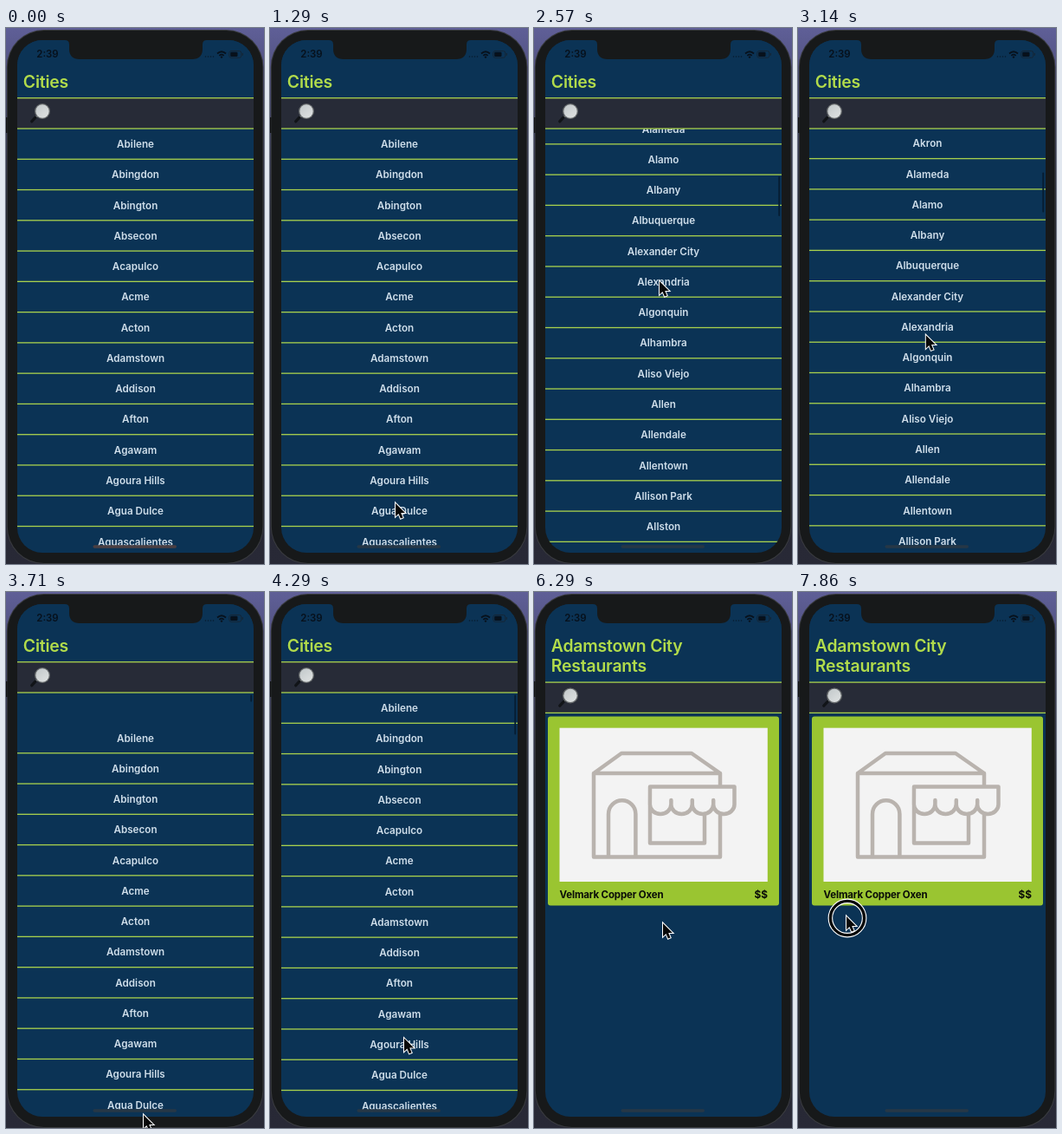
These frames come from a looping animation (298x618 px, 8000 ms). An HTML page with a canvas:

```html
<!DOCTYPE html>
<html lang="en">
<head>
<meta charset="utf-8">
<title>Cities</title>
<style>
html, body { margin: 0; width: 100%; height: 100%; overflow: hidden; background: #17191b; }
canvas { display: block; width: 298px; height: 618px; }
</style>
</head>
<body>
<canvas id="stage"></canvas>
<script>
const W = 298, H = 618, LOOP = 8000, STEP = 142.6, LAST = 55, PITCH = 35.27;
const NAVY = '#0b3355', LIME = '#a9d14c', BEZEL = '#17191a', INK = '#07111c';
const FONT = 'Inter, "Liberation Sans", sans-serif';
const cities = ('Abilene,Abingdon,Abington,Absecon,Acapulco,Acme,Acton,Adamstown,Addison,Afton,' +
  'Agawam,Agoura Hills,Agua Dulce,Aguascalientes,Ahwatukee,Airway Heights,Akron,Alameda,Alamo,' +
  'Albany,Albuquerque,Alexander City,Alexandria,Algonquin,Alhambra,Aliso Viejo,Allen,Allendale,' +
  'Allentown,Allison Park,Allston,Aloha,Alpharetta,Alpine').split(',');

// Key poses as [step, value...], joined linearly
const scrollKeys = [[9, 0], [10, 30], [11, 105], [12, 185], [13, 247], [14, 380], [15, 480], [16, 550],
  [17, 595], [18, 617], [21, 617], [22, 565], [23, 425], [24, 240], [25, 70], [26, -34.5], [27, -18],
  [28, -5], [29, 0]];
const cursorKeys = [[4, 160, 625], [8, 146, 548], [9, 145, 548], [13, 145, 292], [21, 145, 292],
  [26, 159, 603], [28, 159, 603], [33, 149, 382], [46, 149, 382], [51, 68, 367], [52, 68, 367],
  [54, 56, 374]];
const slideKeys = [[38, 0], [39, .42], [40, .78], [41, .94], [42, 1]];

const canvas = document.getElementById('stage'), c = canvas.getContext('2d');
const dpr = window.devicePixelRatio || 1;
canvas.width = W * dpr;
canvas.height = H * dpr;

function at(keys, t, k = 1) {
  const i = keys.findIndex(key => key[0] > t);
  if (i === 0) return keys[0][k];
  if (i < 0) return keys[keys.length - 1][k];
  const a = keys[i - 1], b = keys[i];
  return a[k] + (b[k] - a[k]) * (t - a[0]) / (b[0] - a[0]);
}

function rect(x, y, w, h, fill) {
  c.fillStyle = fill;
  c.fillRect(x, y, w, h);
}

function round(x, y, w, h, r, fill) {
  c.beginPath();
  c.roundRect(x, y, w, h, r);
  c.fillStyle = fill;
  c.fill();
}

function text(s, x, y, size, color, align = 'left', weight = 600, gap = 0) {
  c.font = `${weight} ${size}px ${FONT}`;
  c.letterSpacing = gap + 'px';
  c.textAlign = align;
  c.fillStyle = color;
  c.fillText(s, x, y);
}

function stroke(d, color, width) {
  c.strokeStyle = color;
  c.lineWidth = width;
  c.stroke(new Path2D(d));
}

function disc(x, y, r, fill) {
  c.beginPath();
  c.arc(x, y, r, 0, 7);
  c.fillStyle = fill;
  c.fill();
}

const rule = y => rect(13, y - .65, 273, 1.3, LIME);

function searchBar(y) {
  rect(13, y, 273, 35.4, '#272b37');
  c.lineCap = 'round';
  stroke(`M36 ${y + 20.5}L34 ${y + 22.5}`, '#8c9092', 2);
  stroke(`M34 ${y + 22.5}L29.8 ${y + 27}`, '#111418', 3.4);
  disc(42, y + 15.3, 9, '#65696b');
  const g = c.createLinearGradient(36, y + 8, 48, y + 23);
  g.addColorStop(0, '#c3c9cb');
  g.addColorStop(1, '#dfe2e2');
  disc(42, y + 15.3, 7.7, g);
  rule(y);
  rule(y + 35.3);
}

function header(lines) {
  const top = 57.3 + 23.4 * lines.length;
  rect(13, 14, 273, top - 14, NAVY);
  lines.forEach((s, i) => text(s, 19.8, 69 + 23.3 * i, 19.4, '#b2dc4b', 'left', 600, -.2));
  searchBar(top);
}

function listPage(scroll, t) {
  rect(13, 14, 273, 592, NAVY);
  cities.forEach((name, i) => {
    const y = 116 + PITCH * i - scroll;
    if (y < 70 || y > 620) return;
    text(name, 149.5, y + 22, 11.7, '#cfdeea', 'center');
    rule(y + PITCH);
  });
  header(['Cities']);
  c.globalAlpha = t < 10 ? 0 : Math.max(0, Math.min(1, (41 - t) / 3));
  const length = scroll < 0 ? Math.max(8, 46 + scroll * 1.1) : 46;
  round(282.3, 118.5 + Math.max(0, scroll) * .085, 1.8, length, .9, '#061d33');
  c.globalAlpha = 1;
}

function shop() {
  rect(29.5, 156.7, 240.3, 177.3, '#f3f3f3');
  c.lineJoin = 'round';
  c.lineCap = 'round';
  stroke('M215 257V305.5H69V209L101 186H182L215 209V223M69 209H215' +
    'M86 305V256a15.7 15.7 0 0 1 31.4 0V305' +
    'M134 246V289.5H197V257' +
    'M134 224.5H231.5V245a12.2 11 0 0 1-24.4 0a12.2 11 0 0 1-24.4 0a12.2 11 0 0 1-24.4 0a12.2 11 0 0 1-24.4 0Z' +
    'M158.4 240V246M182.8 240V246M207.2 240V246', '#b9b3ae', 4.5);
}

function shopPage() {
  rect(13, 14, 273, 592, NAVY);
  header(['Adamstown City', 'Restaurants']);
  round(16, 143.5, 267, 218, 3, '#9ac531');
  shop();
  text('Velmark Copper Oxen', 29.5, 352.6, 11.5, '#0a0d08', 'left', 700, -.15);
  text('$$', 270, 352.6, 11.8, '#0a0d08', 'right', 700);
}

function statusBar() {
  text('2:39', 35.3, 34.3, 11.4, INK);
  for (let i = 0; i < 4; i++) disc(230.5 + i * 3, 33, .8, '#071b2d');
  c.lineCap = 'butt';
  stroke('M244 29.5Q249 25 254 29.5', INK, 1.8);
  stroke('M246.3 31.8Q249 29.5 251.7 31.8', INK, 1.6);
  disc(249, 33.6, 1.2, INK);
  c.strokeStyle = '#152636';
  c.lineWidth = 1;
  c.beginPath();
  c.roundRect(257.8, 26.5, 14, 7.8, 2.3);
  c.stroke();
  round(259.2, 27.8, 8.3, 5.2, 1.2, INK);
  rect(272.7, 29, 1.2, 2.8, '#152636');
}

function phone() {
  const g = c.createLinearGradient(0, 0, 0, H);
  g.addColorStop(0, '#5f5f97');
  g.addColorStop(.16, '#45466c');
  g.addColorStop(.35, '#20222d');
  g.addColorStop(1, '#282936');
  rect(0, 0, W, H, g);
  round(.8, 2, 296.6, 616, 43, '#393b3f');
  round(1.8, 3, 294.6, 614, 42, BEZEL);
  rect(0, 103, 1.5, 18, '#101113');
}

function cursor(x, y, ring) {
  if (ring) {
    for (const [r, color, width] of [[19.6, '#fff', 5.6], [19.6, '#050708', 3.4]]) {
      c.beginPath();
      c.arc(57, 376, r, 0, 7);
      c.strokeStyle = color;
      c.lineWidth = width;
      c.stroke();
    }
  }
  const arrow = new Path2D(`M${x} ${y}v15.2l3.5-3.3 2.4 5.7 2.7-1.1-2.4-5.6h4.8z`);
  c.lineJoin = 'miter';
  c.strokeStyle = '#fff';
  c.lineWidth = 2;
  c.stroke(arrow);
  c.fillStyle = '#080808';
  c.fill(arrow);
}

function draw(now) {
  const t = Math.min(LAST, Math.floor(now % LOOP / STEP));
  const slide = at(slideKeys, t);
  c.setTransform(dpr, 0, 0, dpr, 0, 0);
  phone();

  c.save();
  c.beginPath();
  c.roundRect(13, 14, 273, 591, 29);
  c.clip();
  if (slide < 1) {
    c.save();
    c.translate(-82 * slide, 0);
    listPage(at(scrollKeys, t), t);
    c.restore();
  }
  if (slide > 0) {
    c.save();
    c.translate(273 * (1 - slide), 0);
    shopPage();
    c.restore();
  }
  statusBar();
  round(100.5, 596.3, 96.5, 3.4, 1.7, t < 4 ? '#4b3f42' : '#263746');
  c.restore();

  c.fillStyle = BEZEL;
  c.fill(new Path2D('M68 12V14Q73 14 73 19V24Q73 36 85 36H215Q227 36 227 24V19Q227 14 232 14V12Z'));
  if (t > 4) cursor(at(cursorKeys, t, 1), at(cursorKeys, t, 2), t >= 54);
  requestAnimationFrame(draw);
}
requestAnimationFrame(draw);
</script>
</body>
</html>
```
